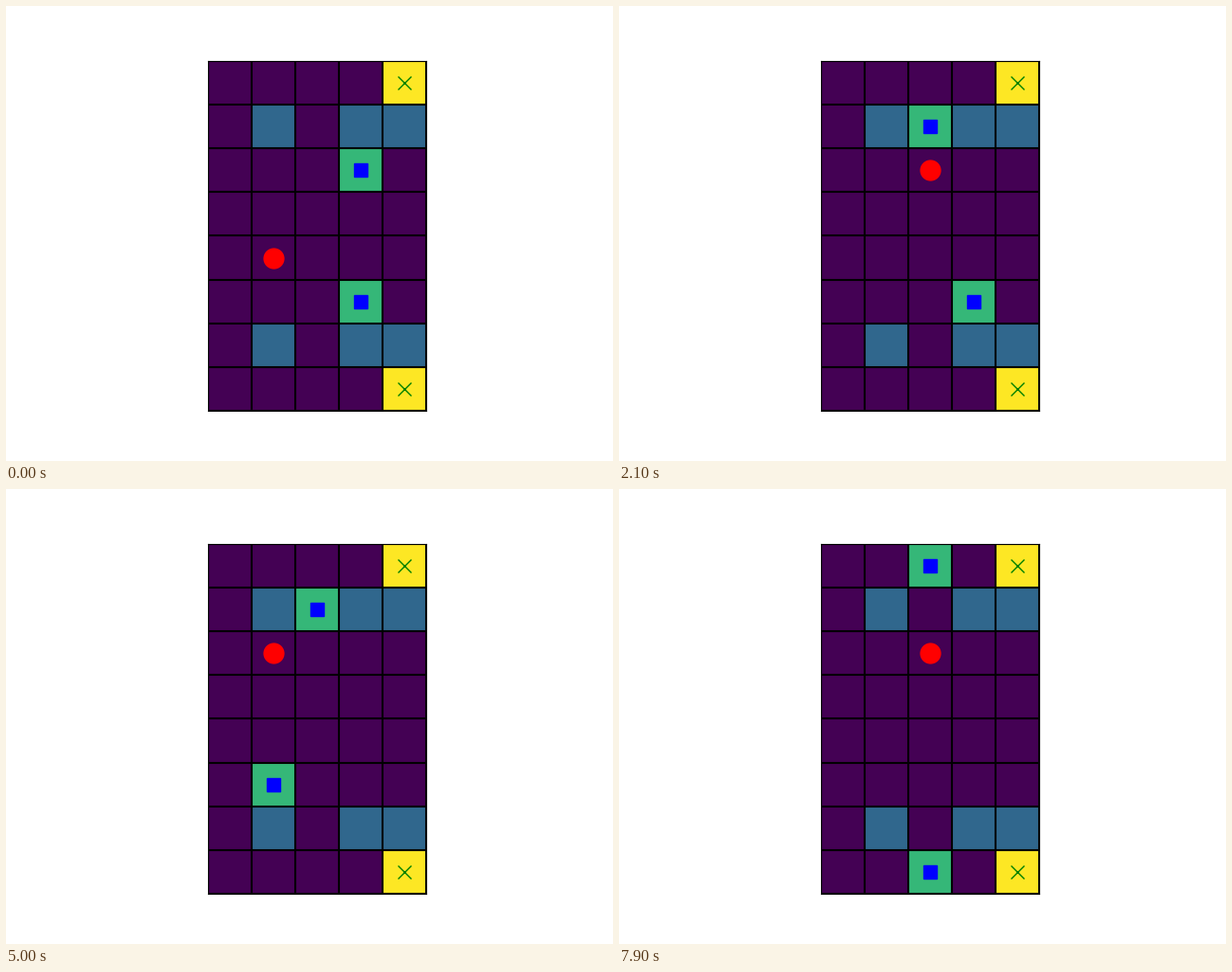
A matplotlib script for the animation above (8 s loop, 640x480 px).

```python
import matplotlib.pyplot as plt
import numpy as np
from matplotlib.animation import FuncAnimation

ROWS, COLS = 8, 5
WALLS = [(1, 1), (1, 3), (1, 4), (6, 1), (6, 3), (6, 4)]
GOALS = [(0, 4), (7, 4)]
START = (4, 1)
BOXES = [(2, 3), (5, 3)]
STEP = {"U": (-1, 0), "D": (1, 0), "L": (0, -1), "R": (0, 1)}
MOVES = (
    "RRURULDLU" "RDDLDLUUU" "DRUDRDRDL"
    "LUUURDLUL" "DDRDUUUDU" "DRULLLUDD"
    "DDRURUUUD" "DDDUUUUDD" "DDDUUUU"
)
FLOOR, WALL, BOX, GOAL = range(4)


def play(moves):
    """Return (player, boxes) after each move; a box in the way is pushed."""
    player, boxes = START, list(BOXES)
    states = [(player, tuple(boxes))]
    for move in moves:
        dr, dc = STEP[move]
        player = (player[0] + dr, player[1] + dc)
        boxes = [(r + dr, c + dc) if (r, c) == player else (r, c)
                 for r, c in boxes]
        states.append((player, tuple(boxes)))
    return states


def board(boxes):
    grid = np.full((ROWS, COLS), FLOOR)
    for cells, kind in ((WALLS, WALL), (GOALS, GOAL), (boxes, BOX)):
        for cell in cells:
            grid[cell] = kind
    return grid


def place(line, cells):
    rows, cols = zip(*cells)
    line.set_data(cols, rows)


states = play(MOVES)

fig, ax = plt.subplots(figsize=(6.4, 4.8), dpi=100)
image = ax.imshow(board(BOXES), cmap="viridis", vmin=FLOOR, vmax=GOAL)
ax.set_xticks(np.arange(COLS + 1) - 0.5)
ax.set_yticks(np.arange(ROWS + 1) - 0.5)
ax.tick_params(length=0, labelbottom=False, labelleft=False)
ax.grid(color="black", linewidth=1.5)

goal_marks, = ax.plot([], [], "gx", markersize=10)
box_marks, = ax.plot([], [], "bs", markersize=10)
player_mark, = ax.plot([], [], "ro", markersize=15)
place(goal_marks, GOALS)
ax.set_xlim(-0.5, COLS - 0.5)
ax.set_ylim(ROWS - 0.5, -0.5)


def draw(i):
    player, boxes = states[i]
    image.set_data(board(boxes))
    place(box_marks, boxes)
    place(player_mark, [player])
    return image, box_marks, player_mark


anim = FuncAnimation(fig, draw, frames=len(states), interval=100,
                     repeat=True, repeat_delay=0)
plt.show()
```
